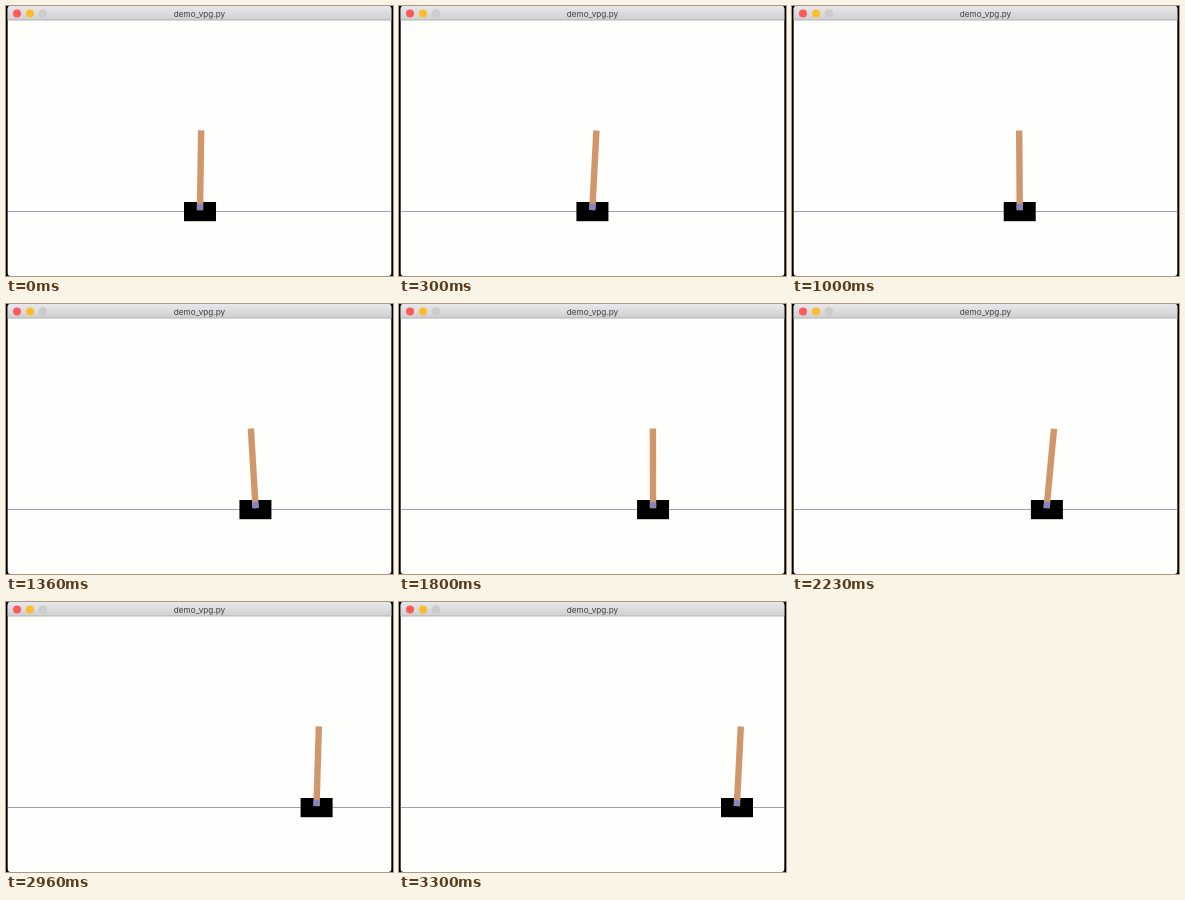
An HTML page that plays this animation: 387 px wide and 270 px high, repeating every 3.46 s.

```html
<!DOCTYPE html>
<html>
<head>
<meta charset="utf-8">
<title>Cart pole</title>
<style>
  html, body { margin: 0; width: 100%; height: 100%; overflow: hidden; background: #000; }
  svg { display: block; width: 387px; height: 270px; }
</style>
</head>
<body>
<svg viewBox="0 0 387 270">
  <defs>
    <linearGradient id="bar" x2="0" y2="1">
      <stop stop-color="#e8e7e9"/>
      <stop offset="1" stop-color="#d0cfd1"/>
    </linearGradient>
    <clipPath id="window"><rect x="1.7" width="383.6" height="270" rx="3"/></clipPath>
  </defs>
  <g clip-path="url(#window)">
    <rect width="387" height="270" fill="#fefefd"/>
    <rect width="387" height="14" fill="url(#bar)"/>
    <rect y="13.5" width="387" height="1" fill="#b4b4b4"/>
    <circle cx="11" cy="7.4" r="4" fill="#fc5b57"/>
    <circle cx="24" cy="7.4" r="4" fill="#fdbc2e"/>
    <circle cx="36.8" cy="7.4" r="3.8" fill="#cdcdcd" stroke="#c2c2c2" stroke-width=".5"/>
    <text x="193.5" y="10.8" text-anchor="middle" font-family="Inter, sans-serif" font-size="8.2" fill="#404040">demo_vpg.py</text>
    <rect y="205" width="387" height="1" fill="#a0a0b2"/>
    <g id="cart">
      <rect x="-16" y="196" width="32" height="19.2"/>
      <rect id="pole" x="-3.2" y="124.4" width="6.4" height="79.8" fill="#d0986a"/>
      <circle cy="201" r="3.2" fill="#8583c8"/>
    </g>
  </g>
</svg>
<script>
const LOOP = 3460, LAST_STEP = 99, POLE = 80;
const cart = document.getElementById('cart');
const pole = document.getElementById('pole');

// The pole sways between these extremes: [seconds, tip offset in px]
const sways = [[0, 1.2], [.45, 5.2], [1.46, -5], [2.26, 7.5], [2.8, 1.8], [3.3, 4]];

// Path of the pole's balance point at even times, with one extra point at each end
const path = [208, 194.8, 198.7, 217, 241, 254, 253.5, 273.5, 305.6, 340.6, 375];
const BALANCE = .65;

function lean(t) {
  const i = Math.max(1, sways.findIndex(s => s[0] >= t));
  const [[t0, a], [t1, b]] = sways.slice(i - 1, i + 1);
  const u = (t - t0) / (t1 - t0);
  return a + (b - a) * u * u * (3 - 2 * u);
}

// Catmull-Rom curve through the path, for progress 0 to 1
function balancePoint(progress) {
  const spans = path.length - 3;
  const i = Math.min(spans - 1, Math.floor(progress * spans));
  const u = progress * spans - i;
  const [a, b, c, d] = path.slice(i, i + 4);
  return b + u / 2 * (c - a + u * (2 * a - 5 * b + 4 * c - d + u * (3 * (b - c) + d - a)));
}

// The picture advances 30 times a second, on 10 ms ticks
function draw(ms) {
  const tick = Math.floor(ms % LOOP / 10);
  const step = Math.min(LAST_STEP, Math.ceil((tick + 1) * 3 / 10) - 1);
  const tip = lean(step / 30);
  const x = balancePoint(step / LAST_STEP) - BALANCE * tip;
  const angle = Math.asin(tip / POLE) * 180 / Math.PI;
  cart.setAttribute('transform', `translate(${x})`);
  pole.setAttribute('transform', `rotate(${angle} 0 201)`);
}

const start = performance.now();
function loop() {
  draw(performance.now() - start);
  requestAnimationFrame(loop);
}
loop();
</script>
</body>
</html>
```
